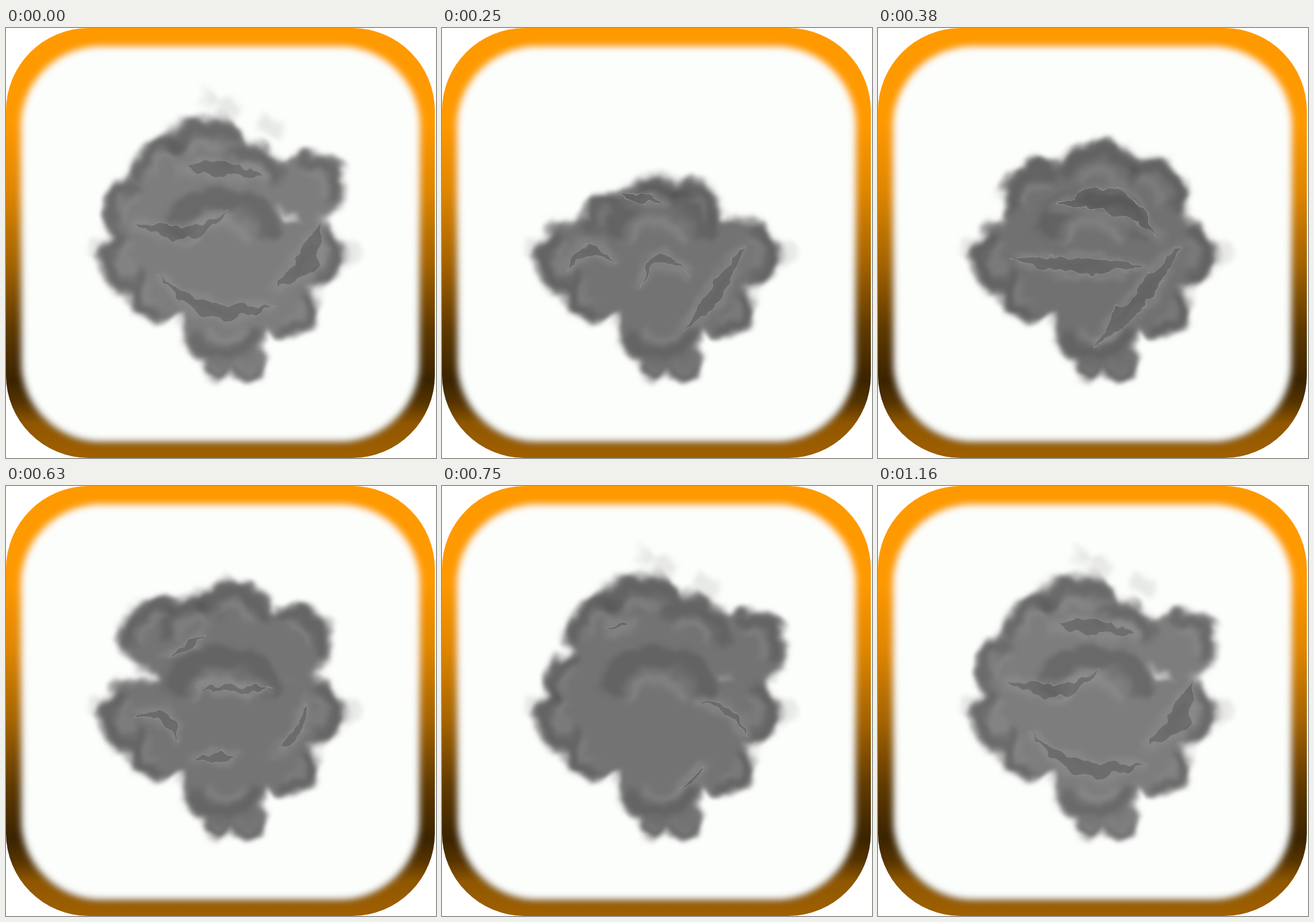
These frames come from a looping animation (748x748 px, 1260 ms). An HTML page:

```html
<!DOCTYPE html>
<html>
<head>
<meta charset="utf-8">
<title>Smoke</title>
<style>
html, body { margin: 0; height: 100%; overflow: hidden; background: #fff }
svg { display: block; width: 100vw; height: 100vh }
.dark, .light, .halo { fill: none; stroke-linecap: round }
.wisp { fill: #aaa; opacity: .25 }
.dark { stroke: #4c4c4c; opacity: .42 }
.light { stroke: #9a9a9a; opacity: .38 }
.halo { stroke: #949494; stroke-width: 14; opacity: .45 }
.crack { fill: #505050; fill-opacity: .45; stroke: #888; stroke-width: 1.6 }
</style>
</head>
<body>
<svg viewBox="0 0 748 748">
  <defs>
    <linearGradient id="amber" x2="0" y2="1">
      <stop offset=".22" stop-color="#f90"/>
      <stop offset=".38" stop-color="#df8600"/>
      <stop offset=".55" stop-color="#a36200"/>
      <stop offset=".7" stop-color="#5f3900"/>
      <stop offset=".82" stop-color="#3a2300"/>
      <stop offset=".87" stop-color="#553300"/>
      <stop offset=".92" stop-color="#905700"/>
      <stop offset="1" stop-color="#a06000"/>
    </linearGradient>
    <linearGradient id="rim" x2="0" y2="1">
      <stop offset=".1" stop-color="#ffdcc0"/>
      <stop offset=".4" stop-color="#e6cdb8"/>
      <stop offset=".8" stop-color="#7d746c"/>
      <stop offset="1" stop-color="#85705c"/>
    </linearGradient>
    <filter id="glow"><feGaussianBlur stdDeviation="6"/></filter>
    <filter id="smoke" x="0" y="0" width="748" height="748" filterUnits="userSpaceOnUse" color-interpolation-filters="sRGB">
      <feGaussianBlur stdDeviation="6" result="soft"/>
      <feTurbulence type="fractalNoise" baseFrequency=".024" numOctaves="2" seed="4"/>
      <feDisplacementMap in="soft" scale="30" xChannelSelector="R" yChannelSelector="G"/>
      <feGaussianBlur stdDeviation="1.5"/>
    </filter>
    <filter id="rough" x="0" y="0" width="748" height="748" filterUnits="userSpaceOnUse" color-interpolation-filters="sRGB">
      <feTurbulence type="fractalNoise" baseFrequency=".04" numOctaves="2" seed="9"/>
      <feDisplacementMap in="SourceGraphic" scale="22" xChannelSelector="R" yChannelSelector="G"/>
    </filter>
  </defs>
  <rect width="746" height="748" rx="144" fill="url(#amber)"/>
  <rect x="27" y="33" width="692" height="687" rx="138" fill="#fcfefb" stroke="url(#rim)" stroke-width="5" filter="url(#glow)"/>
  <g id="stage"></g>
</svg>
<script>
// Puffs and wisps are [x, y, radius]; cracks are [x1, y1, x2, y2, bend, width].
const trunk = [
  [228, 402, 66], [525, 390, 61], [265, 455, 56], [490, 485, 52],
  [375, 390, 130], [380, 515, 75], [371, 584, 28], [420, 584, 30]
];
const sides = [[160, 385, 20], [590, 390, 22]];
const tufts = [[352, 122, 15], [385, 138, 20], [460, 172, 17]];

const billow = {
  tone: "#7d7d7d", wisps: tufts,
  puffs: [[345, 227, 76], [277, 252, 62], [225, 320, 58], [530, 275, 60], [420, 270, 72]],
  cracks: [[310, 245, 445, 258, -.1, 24], [222, 335, 385, 320, .35, 24], [265, 430, 468, 480, .35, 28], [470, 450, 543, 335, .3, 36]]
};
const squat = {
  tone: "#737373", wisps: [],
  puffs: [[375, 320, 65], [295, 337, 52], [430, 325, 62]],
  cracks: [[306, 290, 382, 303, 0, 14], [215, 425, 302, 408, -.7, 22], [345, 452, 430, 430, -.9, 18], [418, 528, 525, 378, .08, 24]]
};
const dome = {
  tone: "#717171", wisps: [],
  puffs: [[286, 300, 71], [385, 280, 85], [465, 295, 75]],
  cracks: [[312, 310, 485, 362, -.4, 44], [232, 400, 465, 415, .05, 26], [375, 556, 525, 378, .05, 30]]
};
const crown = {
  tone: "#747474", wisps: [],
  puffs: [[265, 260, 67], [330, 262, 74], [390, 245, 82], [500, 270, 66]],
  cracks: [[285, 293, 340, 258, .1, 14], [330, 350, 462, 350, .05, 12], [220, 403, 300, 445, -.6, 20], [328, 477, 398, 468, 0, 16], [474, 458, 520, 380, .3, 16]]
};
const plume = {
  tone: "#737373", wisps: tufts,
  puffs: [[345, 230, 80], [280, 255, 65], [235, 345, 55], [430, 270, 82], [535, 280, 65]],
  cracks: [[289, 247, 329, 243, 0, 8], [442, 376, 532, 434, -.3, 13], [413, 526, 455, 488, .1, 10]]
};

const timeline = [[0, billow], [250, squat], [380, dome], [630, crown], [750, plume], [1000, billow]];
const LOOP = 1260;
const stage = document.getElementById("stage");
const poses = [...new Set(timeline.map(step => step[1]))];

const disc = ([x, y, r]) => `<circle cx="${x}" cy="${y}" r="${r}"/>`;
const discs = list => list.map(disc).join("");

// Arc inside a puff, on the side that faces away from the heart of the cloud.
function fold(kind, [x, y, r], reach, width) {
  const out = Math.atan2(y - 400, x - 375);
  const at = turn => `${x + r * reach * Math.cos(out + turn)} ${y + r * reach * Math.sin(out + turn)}`;
  return `<path class="${kind}" stroke-width="${r * width}" d="M${at(-1.1)}A${r * reach} ${r * reach} 0 0 1 ${at(1.1)}"/>`;
}

// Bent sliver, pointed at both ends and widest in the middle.
function crack(kind, [x1, y1, x2, y2, bend, width]) {
  const dx = x2 - x1, dy = y2 - y1, length = Math.hypot(dx, dy);
  const control = side => {
    const push = bend + side * width / length;
    return `${(x1 + x2) / 2 - dy * push} ${(y1 + y2) / 2 + dx * push}`;
  };
  return `<path class="${kind}" d="M${x1} ${y1}Q${control(1)} ${x2} ${y2}Q${control(-1)} ${x1} ${y1}Z"/>`;
}

stage.innerHTML = poses.map(({ tone, wisps, puffs, cracks }) => {
  const cloud = [...trunk, ...puffs];
  return `<g>
    <g filter="url(#smoke)">
      <g class="wisp">${discs([...sides, ...wisps])}</g>
      <g fill="${tone}">${discs(cloud)}</g>
      ${cloud.map(p => fold("dark", p, .74, .3) + fold("light", p, .4, .14)).join("")}
      ${cracks.map(c => crack("halo", c)).join("")}
    </g>
    <g filter="url(#rough)">${cracks.map(c => crack("crack", c)).join("")}</g>
  </g>`;
}).join("");

function draw(now) {
  const t = now % LOOP;
  const current = timeline.findLast(step => step[0] <= t)[1];
  poses.forEach((p, i) => { stage.children[i].style.display = p === current ? "" : "none"; });
  requestAnimationFrame(draw);
}
draw(performance.now());
</script>
</body>
</html>
```
